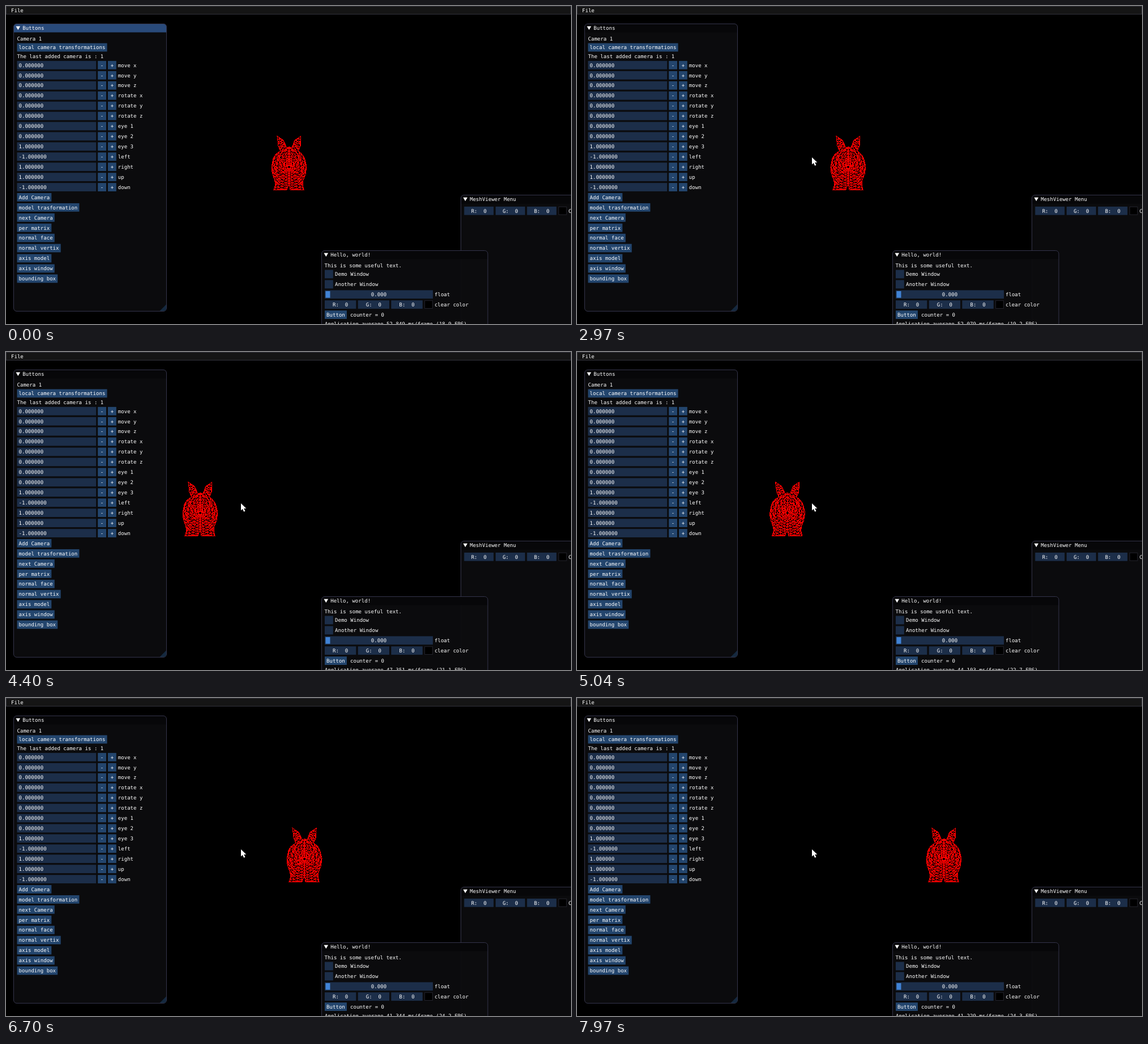
An HTML page that plays this animation: 998 by 561 pixels, repeating every 8000 ms.

```html
<!DOCTYPE html>
<html lang="en">
<head>
<meta charset="utf-8">
<title>Mesh viewer</title>
<style>
html, body { margin: 0; width: 100%; height: 100%; overflow: hidden; background: #000; }
svg { display: block; }
text {
  font: 9.07px "DejaVu Sans Mono", "Liberation Mono", monospace;
  fill: #fff; white-space: pre; text-rendering: geometricPrecision;
}
</style>
</head>
<body>
<svg id="stage" width="998" height="561" viewBox="0 0 998 561"></svg>
<script>
const LOOP = 8000, PITCH = 5.46, ROW = 17.94, ITEM = 14.8;
const C = {
  panel: '#0c0c0e', title: '#070709', active: '#294a7a', border: '#34344a',
  frame: '#1c2e49', button: '#23456d', grip: '#15293f', grab: '#4183d6'
};
const stage = document.getElementById('stage');

function add(tag, attrs, parent = stage) {
  const node = document.createElementNS('http://www.w3.org/2000/svg', tag);
  for (const key in attrs) node.setAttribute(key, attrs[key]);
  return parent.appendChild(node);
}
const rect = (x, y, width, height, fill, more) => add('rect', { x, y, width, height, fill, ...more });

function label(x, middle, string) {
  const node = add('text', { x, y: middle + 3.3 });
  node.textContent = string;
  return node;
}

// Items are placed by their vertical middle.
function box(x, middle, width, fill, string = '') {
  rect(x, middle - ITEM / 2, width, ITEM, fill);
  if (string) label(x + (width - string.length * PITCH) / 2, middle, string);
}
const button = (x, middle, string) => box(x, middle, string.length * PITCH + 6.2, C.button, string);

function panel(x, y, w, h, name) {
  rect(x, y, w, h, C.panel, { rx: 5.5, 'fill-opacity': 0.94 });
  const bar = add('path', {
    d: `M${x} ${y + 15}v-9.5q0-5.5 5.5-5.5h${w - 11}q5.5 0 5.5 5.5v9.5z`, fill: C.title
  });
  rect(x, y, w, h, 'none', { rx: 5.5, stroke: C.border });
  add('path', { d: `M${x + 4} ${y + 4.3}h7.6l-3.8 6.5z`, fill: '#fff' });
  label(x + 15.7, y + 7.4, name);
  return bar;
}

function colorEdit(x, middle, width, step, name) {
  [...'RGB'].forEach((c, i) => box(x + i * step, middle, width, C.frame, c + ':  0'));
  const swatch = x + 3 * step;
  rect(swatch + 0.5, middle - 7, 13.8, 13.8, '#000', { stroke: '#24242c' });
  label(swatch + 17.8, middle, name);
}

// Menu bar
rect(0.5, 0.5, 997, 14, '#151515', { stroke: '#30303a' });
label(9, 7.9, 'File');

// Mesh
const meshShape = 'M-21 229.5L-10 237L-4 250L0 248.5L5 250L10 237L21 229.5L20 247L16 256' +
  'Q26 262 28 271L31 283L29 297L25 307L24 315L26 324H2L1 317L-2 317L-4 324H-27L-24 315' +
  'L-26 305Q-31 295-31 284L-28 269Q-25 261-15 256L-19 247Z';

// Right half of a ring lattice; the left half is its mirror image.
function meshLines() {
  let seed = 7;
  const jitter = () => ((seed = seed * 16807 % 2147483647) / 2147483647 - 0.5) * 1.8;
  const rings = Array.from({ length: 17 }, (_, k) => {
    const n = 4 + Math.round(1.5 * k), r = (k + 0.7) * 3.6 + (k > 4 ? 1.5 : 0);
    return Array.from({ length: n + 1 }, (_, i) => {
      const a = (i / n - 0.5) * Math.PI;
      const x = Math.abs(r * Math.cos(a) + jitter()), y = 284 + r * 1.12 * Math.sin(a) + jitter();
      return x.toFixed(1) + ' ' + y.toFixed(1);
    });
  });
  let d = '';
  rings.forEach((ring, k) => {
    d += 'M' + ring.join('L');
    if (!k) return;
    const inner = rings[k - 1], last = inner.length - 1;
    ring.forEach((p, i) => {
      const j = Math.round(i * last / (ring.length - 1));
      d += `M${inner[j]}L${p}L${inner[Math.min(j + 1, last)]}`;
    });
  });
  return d;
}
add('path', { d: meshShape }, add('clipPath', { id: 'silhouette' }));
const mesh = add('g', { fill: 'none', stroke: '#f00', 'shape-rendering': 'crispEdges' });
const lattice = add('g', { 'clip-path': 'url(#silhouette)' }, mesh);
for (const side of [1, -1]) add('path', { d: meshLines(), transform: `scale(${side} 1)` }, lattice);
add('path', { d: meshShape }, mesh);

// Buttons window
const titleBar = panel(13.5, 31.5, 270, 507, 'Buttons');
add('path', { d: 'M283 526.5V533.5Q283 538 278.5 538H271.5Z', fill: C.grip });
label(19.5, 57.6, 'Camera 1');
button(19.5, 73, 'local camera transformations');
label(19.5, 88.8, 'The last added camera is : 1');
['move x', 'move y', 'move z', 'rotate x', 'rotate y', 'rotate z',
  'eye 1', 'eye 2', 'eye 3', 'left', 'right', 'up', 'down'].forEach((name, i) => {
  const y = 104.3 + i * ROW;
  const value = /left|down/.test(name) ? -1 : /eye 3|right|up/.test(name) ? 1 : 0;
  box(19.5, y, 139.7, C.frame);
  label(22.5, y, value.toFixed(6));
  box(162.2, y, ITEM, C.button, '-');
  box(180, y, ITEM, C.button, '+');
  label(197.8, y, name);
});
['Add Camera', 'model trasformation', 'next Camera', 'per matrix', 'normal face',
  'normal vertix', 'axis model', 'axis window', 'bounding box']
  .forEach((name, i) => button(19.5, 337.4 + i * ROW, name));

// Viewer menu window
panel(803.5, 333.5, 300, 300, 'MeshViewer Menu');
colorEdit(809.3, 361.3, 52, 55.5, 'Clear Color');

// Hello window
panel(557.5, 431.5, 293.5, 200, 'Hello, world!');
label(562.6, 457.5, 'This is some useful text.');
['Demo Window', 'Another Window'].forEach((name, i) => {
  box(563, 473 + i * ROW, ITEM, C.frame);
  label(581, 473 + i * ROW, name);
});
box(563, 508.8, 191, C.frame, '0.000');
rect(564.5, 503, 8, 11.7, C.grab);
label(757, 508.8, 'float');
colorEdit(563, 526.7, 55.4, 58.7, 'clear color');
button(563, 544.6, 'Button');
label(608, 544.6, 'counter = 0');
const stats = label(563, 560.2, '');

const cursor = add('path', {
  d: 'M0 0V12.6L3 10L5.1 14.8L7.4 13.8L5.3 9.1H9.3Z',
  fill: '#fff', stroke: '#000', 'paint-order': 'stroke'
});

// Motion tables: [time, value, ...]
const meshPath = [[0, 500], [2750, 500], [4400, 343], [4745, 343], [5840, 449], [6700, 527], [7970, 648]];
const cursorPath = [[0, 690, -20], [350, 690, -20], [1100, 627, 236], [1800, 627, 236], [2450, 415, 267]];
const frameTime = [[0, 52.848], [1730, 54.447], [3770, 50.554], [5040, 44.107],
  [5840, 41.222], [6700, 41.344], [7970, 41.229]];
const CLICK = 2560;

function at(table, t) {
  const next = table.findIndex(row => row[0] > t);
  if (next < 0) return table[table.length - 1].slice(1);
  const a = table[next - 1], b = table[next], f = (t - a[0]) / (b[0] - a[0]);
  return a.slice(1).map((v, i) => v + (b[i + 1] - v) * f);
}

function draw(time) {
  const t = time % LOOP;
  const [x, y] = at(cursorPath, t), [ms] = at(frameTime, t);
  mesh.setAttribute('transform', `translate(${at(meshPath, t)[0].toFixed(2)} 0)`);
  cursor.setAttribute('transform', `translate(${x.toFixed(1)} ${y.toFixed(1)})`);
  titleBar.setAttribute('fill', t < CLICK ? C.active : C.title);
  stats.textContent = `Application average ${ms.toFixed(3)} ms/frame (${(1000 / ms).toFixed(1)} FPS)`;
}

const start = performance.now();
function tick() {
  draw(performance.now() - start);
  requestAnimationFrame(tick);
}
tick();
</script>
</body>
</html>
```
